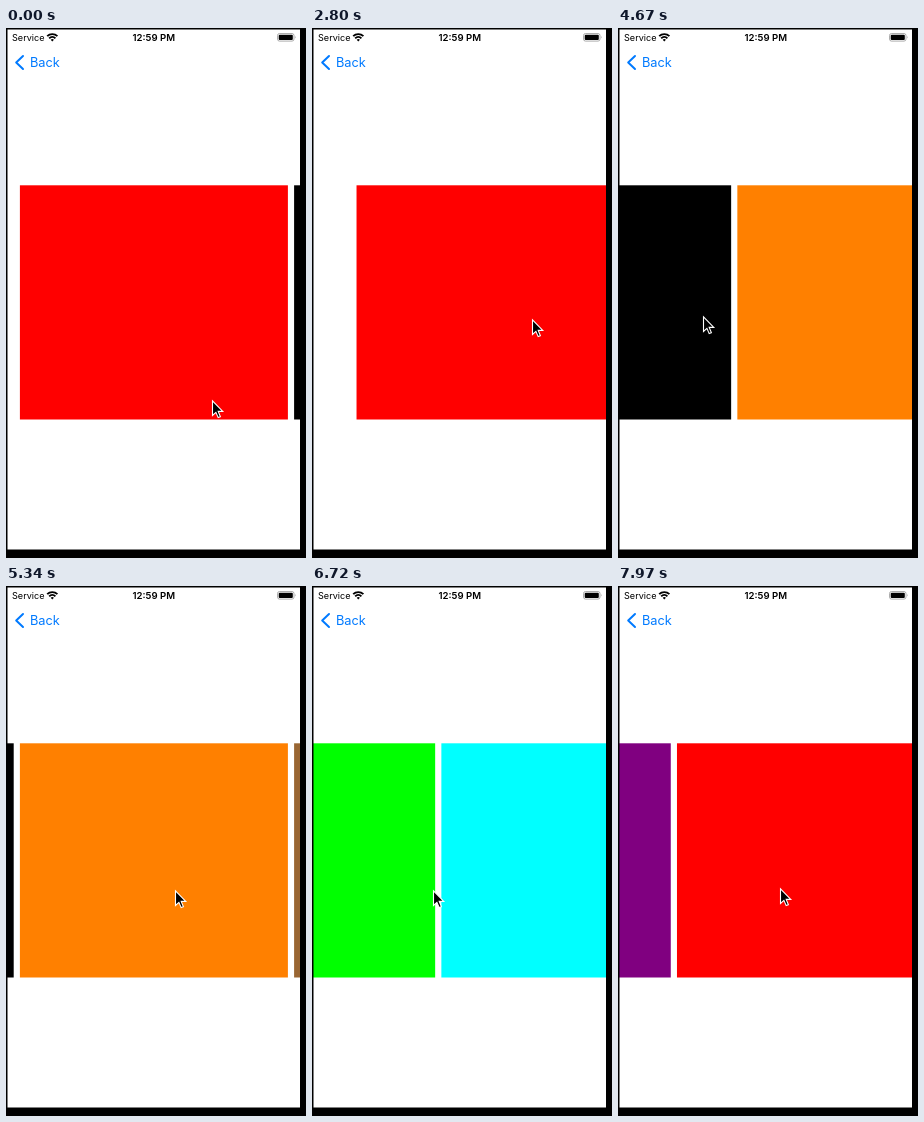
Recreate the animation shown at these times as an HTML page. Size 300x530 px, loop 8000 ms.

```html
<!DOCTYPE html>
<html lang="en">
<meta charset="utf-8">
<title>Carousel</title>
<style>
  html, body { margin: 0; width: 100%; height: 100%; overflow: hidden; background: #000; }
  svg { display: block; width: 300px; height: 530px; font-family: Inter, Roboto, sans-serif; }
</style>
<svg viewBox="0 0 300 530">
  <rect y="1.5" width="300" height="520" fill="#fff"/>
  <g id="cards"></g>
  <path d="M0 0H1.5V530H0zM294 0H300V530H294z"/>

  <text x="6" y="13" font-size="9.1">Service</text>
  <g fill="none" stroke="#000" stroke-width="1.9">
    <path d="M41.2 8.2a7.2 7.2 0 0 1 10.2 0M43.2 10.3a4.4 4.4 0 0 1 6.2 0"/>
    <path d="M46.3 13.4l-1.6-1.7a2.3 2.3 0 0 1 3.2 0z" fill="#000" stroke="none"/>
  </g>
  <text x="147.8" y="13" font-size="9.6" font-weight="600" text-anchor="middle">12:59 PM</text>
  <rect x="271.5" y="5.5" width="16.5" height="7.6" rx="2" fill="none" stroke="#999" stroke-width=".8"/>
  <rect x="272.7" y="6.7" width="14.1" height="5.2" rx="1"/>
  <path d="M289 8q1.2 1.3 0 2.6z" fill="#999"/>

  <path d="M17 28l-6.8 6.5L17 41" fill="none" stroke="#007aff" stroke-width="2" stroke-linecap="round" stroke-linejoin="round"/>
  <text x="24" y="39" font-size="12.8" fill="#007aff">Back</text>

  <path id="cursor" d="M.5 .8V15.4L3.9 12.3L6.2 17.6L8.4 16.7L6.2 11.4H10.8Z" stroke="#fff" stroke-width="1.1"/>
</svg>
<script>
const LOOP = 8000, LEFT = 13.9, WIDTH = 268, PITCH = 274.2;
const SLOP = 9;      // pointer travel before the cards follow
const DECAY = 65;    // time constant of the snap to a page, ms
const GLIDE = 460;   // longest free pointer move between drags, ms
const COLORS = ['red', 'black', '#ff8000', '#963', 'lime', 'cyan', 'purple', 'red'];

// The first two drags fall back to page 0, each later one turns a page.
const DRAGS = [
  { start: 1320, end: 1866, from: 186, to: 150, y: 290 },
  { start: 2460, end: 2900, from: 150, to: 224, y: 291 },
  { start: 3580, end: 3750, from: 156, to: 87, y: 291 },
  { start: 4470, end: 4629, from: 165, to: 83, y: 288 },
  { start: 5340, end: 5470, from: 170, to: 100, y: 304 },
  { start: 5975, end: 6100, from: 178, to: 125, y: 306 },
  { start: 6540, end: 6677, from: 175, to: 119, y: 304 },
  { start: 7120, end: 7240, from: 178, to: 118, y: 303 },
  { start: 7800, end: 7865, from: 215, to: 162, y: 302 }
];

const cards = document.getElementById('cards');
const cursor = document.getElementById('cursor');
cards.innerHTML = COLORS.map((c, i) =>
  `<rect x="${LEFT + i * PITCH}" y="157.3" width="${WIDTH}" height="234.2" fill="${c}"/>`).join('');

const mix = (a, b, u) => a + (b - a) * u;
const part = (t, a, b) => Math.min(1, Math.max(0, (t - a) / (b - a)));
const smooth = u => u * u * (3 - 2 * u);
const easeOut = u => 1 - (1 - u) ** 2;

// Card offset for a pointer travel; pulling past the first card meets resistance.
const follow = travel =>
  travel < 0 ? Math.min(0, travel + SLOP) / 2 : Math.max(0, travel - SLOP);

function pose(t) {
  let x = 206, y = 372, scroll = 0, page = 0, freeAt = 200;
  for (const [i, d] of DRAGS.entries()) {
    const glide = smooth(part(t, freeAt, Math.min(freeAt + GLIDE, d.start)));
    x = mix(x, d.from, glide);
    y = mix(y, d.y, glide);
    if (t < d.start) break;

    x = mix(d.from, d.to, easeOut(part(t, d.start, d.end)));
    scroll = page * PITCH + follow(d.from - x);
    if (t < d.end) break;

    page = Math.max(0, i - 1);
    scroll = mix(page * PITCH, scroll, Math.exp((d.end - t) / DECAY));
    freeAt = d.end;
  }
  return { x, y, scroll };
}

const begin = performance.now();
function tick() {
  const { x, y, scroll } = pose((performance.now() - begin) % LOOP);
  cards.setAttribute('transform', `translate(${-scroll})`);
  cursor.setAttribute('transform', `translate(${Math.round(x)} ${Math.round(y)})`);
  requestAnimationFrame(tick);
}
tick();
</script>
</html>
```
